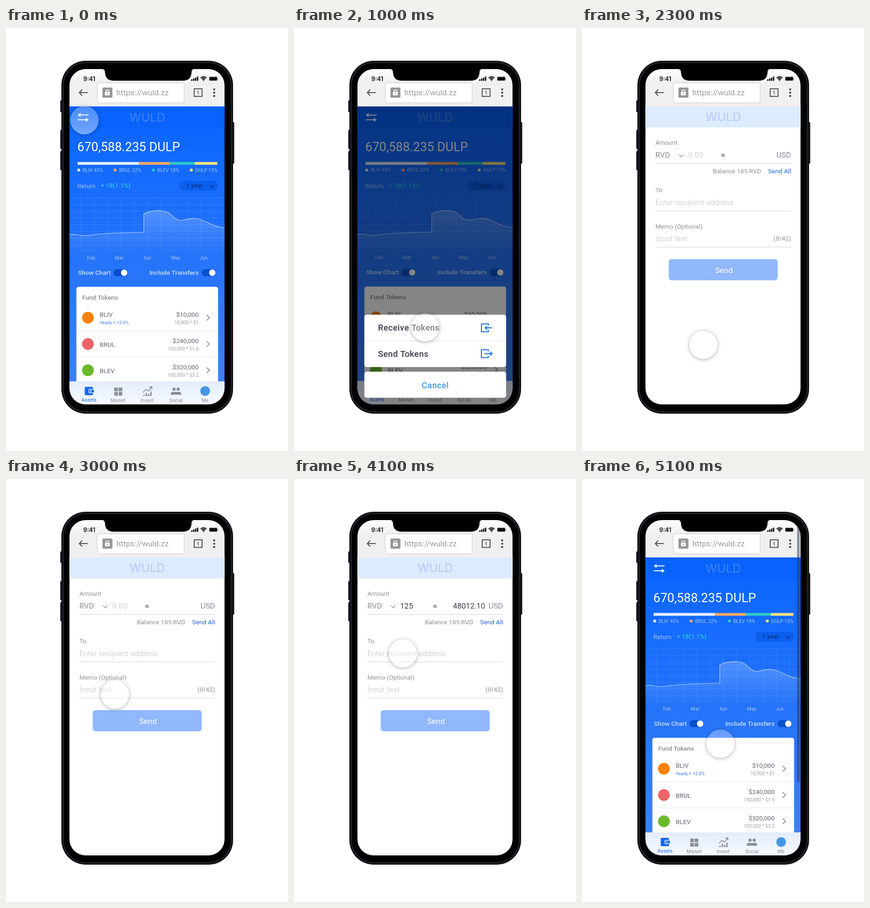
Animation of 611 by 917 pixels, one loop 5.2 s. Source, as an HTML page with a canvas:

```html
<!DOCTYPE html>
<html lang="en">
<head>
<meta charset="utf-8">
<title>Wallet transfer</title>
<style>
html, body { margin: 0; width: 100%; height: 100%; overflow: hidden; background: #fff; }
canvas { display: block; }
</style>
</head>
<body>
<canvas id="stage" width="611" height="917"></canvas>
<script>
const ctx = document.getElementById('stage').getContext('2d');
const LOOP = 5200;
const BRAND = 'WULD';
const GREY = '#8a9099', INK = '#3a404e', FAINT = '#d2d4d9', BLUE = '#1468f0';

function box(x, y, w, h, color, r = 0) {
  ctx.fillStyle = color;
  ctx.beginPath();
  ctx.roundRect(x, y, w, h, r);
  ctx.fill();
}

function dot(x, y, r, color) {
  ctx.fillStyle = color;
  ctx.beginPath();
  ctx.arc(x, y, r, 0, Math.PI * 2);
  ctx.fill();
}

function line(points, color, width = 1) {
  ctx.strokeStyle = color;
  ctx.lineWidth = width;
  ctx.beginPath();
  points.forEach(([x, y], i) => i ? ctx.lineTo(x, y) : ctx.moveTo(x, y));
  ctx.stroke();
}

function text(str, x, y, size, color, { weight = 400, align = 'left', font = 'Roboto', spacing = 0 } = {}) {
  ctx.font = `${weight} ${size}px ${font}, sans-serif`;
  ctx.textAlign = align;
  ctx.letterSpacing = spacing + 'px';
  ctx.fillStyle = color;
  ctx.fillText(str, x, y);
}

function fade(y0, y1, from, to) {
  const g = ctx.createLinearGradient(0, y0, 0, y1);
  g.addColorStop(0, from);
  g.addColorStop(1, to);
  return g;
}

const right = { align: 'right' }, center = { align: 'center' };
const brand = (y, color) => text(BRAND, 306, y, 25.5, color, { weight: 500, align: 'center', font: 'Inter' });
const chevronDown = (x, y, color) => line([[x - 4.5, y - 2.5], [x, y + 2.5], [x + 4.5, y - 2.5]], color, 1.5);

function screenPath() {
  ctx.beginPath();
  ctx.roundRect(137.5, 89, 336, 727, 35);
}

function phoneBody() {
  [[157, 25], [221, 41], [267, 41]].forEach(([y, h]) => box(117.5, y, 5, h, '#17171d', 1.5));
  box(489, 204, 5.5, 90, '#17171d', 1.5);
  box(120, 71, 372, 765, '#0e0e13', 53);
  ctx.strokeStyle = '#2e2e39';
  ctx.lineWidth = 1.5;
  ctx.beginPath();
  ctx.roundRect(123.5, 74.5, 365, 758, 50);
  ctx.stroke();
  box(126, 77, 360, 753, '#000', 47);
}

function notch() {
  ctx.fillStyle = '#000';
  ctx.beginPath();
  ctx.moveTo(207, 88);
  ctx.quadraticCurveTo(214, 89, 214.5, 96);
  ctx.quadraticCurveTo(215, 114, 233, 114.2);
  ctx.lineTo(384, 114.2);
  ctx.quadraticCurveTo(401, 114, 402, 96);
  ctx.quadraticCurveTo(402, 89, 409, 88);
  ctx.fill();
}

function browserBar() {
  box(137, 89, 337, 81, fade(96, 118, '#fcfcfc', '#f0f0f0'));
  text('9:41', 167.5, 115, 12.8, '#111', { weight: 600, font: 'Inter' });
  for (let i = 0; i < 4; i++) box(401 + i * 4.2, 111.5 - i * 2, 3, 3 + i * 2, '#111', .7);
  ctx.strokeStyle = '#111';
  [3.5, 6.2, 9].forEach(r => {
    ctx.lineWidth = 1.9;
    ctx.beginPath();
    ctx.arc(428, 114.5, r, -Math.PI * .75, -Math.PI * .25);
    ctx.stroke();
  });
  dot(428, 113.5, 1.3, '#111');
  box(440, 105.5, 18, 9, '#777', 2.5);
  box(441, 106.5, 16, 7, '#0c0c0c', 1.5);
  box(458.6, 108.5, 1.4, 3, '#777');

  line([[177, 140], [159.5, 140]], '#4c4c4c', 2);
  line([[165, 133.5], [158.8, 140], [165, 146.5]], '#4c4c4c', 2);
  ctx.save();
  ctx.shadowColor = 'rgba(0,0,0,.28)';
  ctx.shadowBlur = 3;
  box(198.5, 119.5, 186.5, 42, '#fff', 2);
  ctx.restore();
  box(209, 129, 21.5, 22, '#979797', 2);
  box(214.5, 138, 10.5, 8, '#fff', 1);
  ctx.strokeStyle = '#fff';
  ctx.lineWidth = 1.6;
  ctx.beginPath();
  ctx.arc(219.8, 137, 3, Math.PI, 0);
  ctx.stroke();
  dot(219.8, 142, 1.2, '#979797');
  text('https://wuld.zz', 239, 146, 17.2, '#999');
  ctx.strokeStyle = '#4c4c4c';
  ctx.lineWidth = 2;
  ctx.strokeRect(407.8, 131.8, 17, 16.5);
  text('1', 416.2, 144, 10, '#4c4c4c', { weight: 700, align: 'center' });
  [133, 140.2, 147.4].forEach(y => dot(451, y, 2.3, '#4c4c4c'));
}

function tracePlateau() {
  ctx.lineTo(298.5, 403);
  ctx.bezierCurveTo(311, 397, 325, 395, 337, 396);
  ctx.bezierCurveTo(360, 397, 361, 417, 379, 417);
  ctx.bezierCurveTo(393, 415, 400, 411, 417, 414);
  ctx.bezierCurveTo(437, 419, 446, 431, 474, 433);
}

function chart() {
  const grid = 'rgba(255,255,255,.1)';
  for (let i = 0; i < 11; i++) line([[162 + i * 28.8, 368], [162 + i * 28.8, 485]], grid);
  for (let i = 0; i < 9; i++) line([[138, 368.5 + i * 14.5], [474, 368.5 + i * 14.5]], grid);

  const trace = () => {
    ctx.beginPath();
    ctx.moveTo(137, 448);
    ctx.bezierCurveTo(152, 445, 158, 451, 176, 450);
    ctx.bezierCurveTo(200, 446, 240, 443.5, 298.5, 443);
    tracePlateau();
  };
  trace();
  ctx.lineTo(474, 485);
  ctx.lineTo(137, 485);
  ctx.fillStyle = fade(396, 485, 'rgba(255,255,255,.23)', 'rgba(255,255,255,.01)');
  ctx.fill();
  trace();
  ctx.strokeStyle = 'rgba(255,255,255,.65)';
  ctx.lineWidth = 1.2;
  ctx.stroke();
  ['Feb', 'Mar', 'Apr', 'May', 'Jun'].forEach((m, i) =>
    text(m, 184.5 + i * 61, 501.5, 10.7, 'rgba(255,255,255,.58)', center));
}

function toggle(label, x, end) {
  text(label, end, 535, 13.7, 'rgba(255,255,255,.75)', { weight: 500, align: 'right' });
  box(x, 523, 31, 15, '#0a4ecc', 7.5);
  dot(x + 23, 530.5, 6.9, '#fff');
}

function fundRow(y, name, color, amount, detail, note) {
  dot(177.5, y, 12.7, color);
  text(name, 203, note ? y - 2 : y + 6, 13.7, '#5d6370');
  if (note) text(note, 203, y + 13.5, 9.8, '#2d74e4');
  text(amount, 417.5, y - 2, 13.7, '#5d6370', right);
  text(detail, 417.5, y + 13.5, 10.4, '#9a9da4', right);
  line([[434.5, y - 6], [441, y], [434.5, y + 6]], '#999', 2);
}

function tabBar() {
  box(137, 766, 337, 51, fade(766, 816, '#e4edfd', '#f6f9ff'));
  const grey = '#8b8f96';
  box(170.5, 778, 18, 18, BLUE, 2.5);
  box(179, 782.5, 12, 9, '#eaf1fd', 1.5);
  box(180.5, 784, 10, 6, BLUE, 1);
  dot(184, 787, 1.4, '#fff');
  [[234.5, 779.5], [244, 779.5], [234.5, 789], [244, 789]].forEach(([x, y]) => box(x, y, 8, 8, grey));
  [3, 7, 5, 10].forEach((h, i) => box(297.5 + i * 5, 798 - h, 3, h, grey));
  line([[297, 790], [303, 783.5], [308, 787], [315, 779]], grey, 1.8);
  line([[310.5, 778], [316, 778], [316, 783.5]], grey, 1.8);
  [364, 373].forEach(x => {
    dot(x, 783, 3.6, grey);
    box(x - 7, 789, 13.5, 6, grey, [4, 4, 0, 0]);
  });
  dot(431.5, 787, 10.5, '#4597e6');
  ['Assets', 'Market', 'Invest', 'Social', 'Me'].forEach((s, i) =>
    text(s, 180 + i * 62.8, i ? 811 : 810, 10.6, i ? grey : BLUE, center));
}

// Horizontal arrow with a solid head at tipX
function solidArrow(tailX, tipX, y) {
  const neck = tipX - Math.sign(tipX - tailX) * 6;
  line([[tailX, y], [neck, y]], '#fff', 2);
  ctx.fillStyle = '#fff';
  ctx.beginPath();
  ctx.moveTo(tipX, y);
  ctx.lineTo(neck, y - 4.5);
  ctx.lineTo(neck, y + 4.5);
  ctx.fill();
}

function home() {
  box(137, 169, 337, 648, fade(216, 766, '#0c66ff', '#3c80f5'));
  box(137, 169, 337, 47.5, '#0862fb');
  brand(203, '#397ffb');
  solidArrow(179, 155.5, 188.5);
  solidArrow(155.5, 179, 199);

  text('670,588.235 DULP', 154.5, 267, 27, '#fff');
  [
    [155, 133, '#e9effc', 157.5, 'BLIV 45%'],
    [288, 67, '#f5a563', 236.5, 'BRUL 22%'],
    [355, 54, '#2cc9c6', 319.5, 'BLEV 18%'],
    [409, 49, '#f8e27c', 401.5, 'DULP 15%']
  ].forEach(([x, w, color, dx, label]) => {
    box(x, 290.5, w, 6, color);
    dot(dx, 308, 3.2, color);
    text(label, dx + 8.5, 311.5, 10.5, 'rgba(255,255,255,.62)');
  });
  text('Return', 154.5, 347, 13.5, 'rgba(255,255,255,.58)');
  text('+ 18(1.1%)', 205, 346, 13.7, '#2fdcd6');
  box(375, 331, 84.5, 21.5, '#0c5fec', 10.7);
  text('1 year', 390, 346, 13.7, '#0a2f7c');
  chevronDown(445.5, 343.5, '#0a2f7c');

  chart();
  toggle('Show Chart', 233, 227);
  toggle('Include Transfers', 424, 417.5);

  box(152.5, 561, 307, 210, '#fff', 5);
  text('Fund Tokens', 165, 588.5, 13.7, '#868b94', { weight: 500 });
  fundRow(628, 'BLIV', '#fb8109', '$10,000', '10,000 * $1', 'Yearly + 12.0%');
  fundRow(685, 'BRUL', '#ee6569', '$240,000', '150,000 * $1.6');
  fundRow(742, 'BLEV', '#6bb82c', '$320,000', '100,000 * $3.2');
  [656.5, 713].forEach(y => line([[152.5, y], [459.5, y]], '#e4e5e8'));
  tabBar();
}

function transferIcon(y, out) {
  line([[421, y - 5], [421, y - 8.5], [406, y - 8.5], [406, y + 8.5], [421, y + 8.5], [421, y + 5]], BLUE, 2);
  if (out) {
    line([[413, y], [429, y]], BLUE, 2);
    line([[425, y - 4], [429, y], [425, y + 4]], BLUE, 2);
  } else {
    line([[429, y], [414, y]], BLUE, 2);
    line([[418.5, y - 4], [414.5, y], [418.5, y + 4]], BLUE, 2);
  }
}

function actionSheet() {
  ctx.save();
  ctx.translate(0, 258 * .002);
  ctx.scale(1, .998);
  home();
  ctx.restore();
  box(137, 169.5, 337, 648, 'rgba(0,0,0,.48)');
  box(152.5, 621.5, 307, 113.5, '#fff', 5);
  box(152.5, 745, 307, 56.5, '#fff', 5);
  line([[152.5, 678.5], [459.5, 678.5]], '#e4e5e8');
  const style = { weight: 500, spacing: .35 };
  text('Receive Tokens', 182, 656, 18.5, INK, style);
  text('Send Tokens', 182, 712.5, 18.5, INK, style);
  text('Cancel', 306, 780.5, 18.5, '#4599ea', { ...style, align: 'center' });
  transferIcon(650, false);
  transferIcon(706, true);
}

function sendForm(hasAmount, hasAddress) {
  const shift = hasAddress ? 1 : 0;
  const rule = y => line([[159, y], [453, y]], '#cfd1d5', 1.2);
  box(137, 169, 337, 648, '#fff');
  box(137, 169, 337, 46.5, '#dcebfe');
  brand(202, '#bacffd');

  text('Amount', 159, 253, 13.6, GREY);
  text('RVD', 159, 281, 16.6, GREY);
  chevronDown(215, 277, GREY);
  text(hasAmount ? '125' : '0.00', 230, 281, 16.6, hasAmount ? INK : FAINT);
  text('≈', 305.5, 281, 16.6, INK, center);
  if (hasAmount) text('48012.10', 414, 281, 16.6, INK, right);
  text('USD', 453, 281, 16.6, GREY, right);
  rule(293.5);
  text('Balance 185 RVD', 388, 315, 13.7, GREY, right);
  text('Send All', 453, 315, 13.7, '#2466df', right);

  text('To', 159, 356, 13.6, GREY);
  text(hasAddress ? 'Tulvenaddress' : 'Enter recipient address', 159, 383.5 + shift, 16.6, hasAddress ? INK : FAINT);
  rule(396.5 + shift);
  text('Memo (Optional)', 159, 435 + shift, 13.6, GREY);
  text('Input text', 159, 462 + shift, 16.6, FAINT);
  text('(0/42)', 453, 461 + shift, 13.7, GREY, right);
  rule(475 + shift);

  if (hasAddress) {
    text('Transaction fee', 159, 514.5, 13.6, GREY);
    text('0.00 USD', 446.5, 514.5, 13.6, GREY, right);
  }
  const top = hasAddress ? 543 : 501;
  box(188, top, 236, 46, hasAddress ? '#2172f5' : '#90b8fb', 6);
  text('Send', hasAddress ? 305.5 : 307.5, top + 29.5, 17, '#fff', center);
}

// Pointer stops: time, x, y
const stops = [
  [0, 170, 200], [300, 168, 196], [1000, 284, 649], [1500, 271, 709], [1800, 268, 706],
  [2300, 263, 687], [2600, 258, 660], [3400, 214, 276], [3600, 212, 274], [3800, 244, 278],
  [4100, 236, 378], [4400, 297, 578], [4500, 297, 580], [5100, 300, 574], [5200, 300, 574]
];

function pointer(t) {
  const i = stops.findIndex(s => s[0] > t);
  const [t0, x0, y0] = stops[i - 1], [t1, x1, y1] = stops[i];
  const p = (t - t0) / (t1 - t0), e = p * p * (3 - 2 * p);
  const x = x0 + (x1 - x0) * e, y = y0 + (y1 - y0) * e;

  // Shadow stays outside the translucent disc.
  ctx.save();
  ctx.beginPath();
  ctx.rect(0, 0, 611, 917);
  ctx.arc(x, y, 30.5, 0, Math.PI * 2);
  ctx.clip('evenodd');
  ctx.shadowColor = 'rgba(0,0,0,.33)';
  ctx.shadowBlur = 9;
  ctx.shadowOffsetY = 1;
  dot(x, y, 30.5, '#fff');
  ctx.restore();
  dot(x, y, 30.5, fade(y - 31, y + 31, 'rgba(255,255,255,.28)', 'rgba(255,255,255,.42)'));
}

function draw(t) {
  box(0, 0, 611, 917, '#fff');
  phoneBody();
  ctx.save();
  screenPath();
  ctx.clip();
  if (t < 400 || t >= 4800) home();
  else if (t < 1700) actionSheet();
  else sendForm(t >= 3800, t >= 4200);
  browserBar();
  if (t >= 4800) box(466, 95, 5.5, 562, 'rgba(40,50,80,.5)', 2.7);
  pointer(t);
  ctx.restore();
  notch();
}

function tick() {
  draw(performance.now() % LOOP);
  requestAnimationFrame(tick);
}
tick();
</script>
</body>
</html>
```
